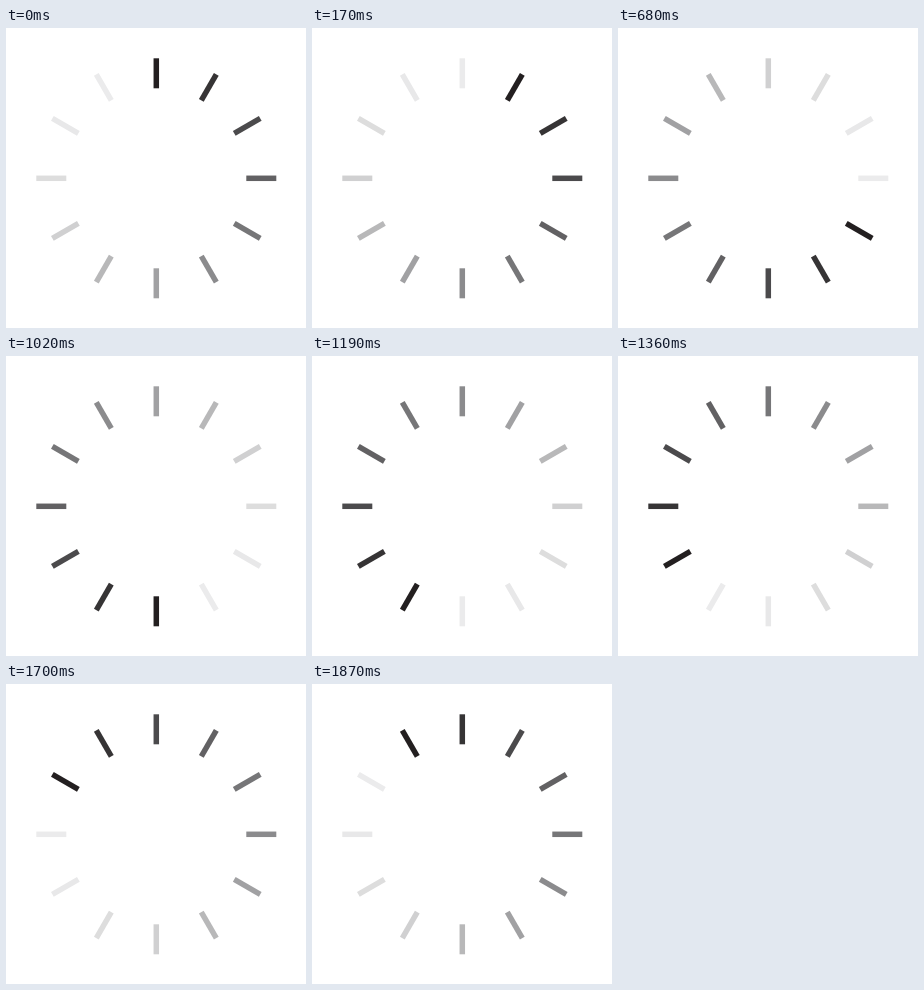
Write an HTML page with a canvas that moves like this. It is 300 px wide and 300 px high and loops after 2.04 s.

```html
<!DOCTYPE html>
<html lang="en">
<head>
<meta charset="utf-8">
<title>Spinner</title>
<style>
  html, body { margin: 0; width: 100%; height: 100%; overflow: hidden; background: #fff; }
  canvas { display: block; width: 300px; height: 300px; }
</style>
</head>
<body>
<canvas id="stage" width="300" height="300"></canvas>
<script>
const ctx = document.getElementById('stage').getContext('2d');
const BARS = 12;
const STEP = 170;
const CENTER = 150.3;
const INNER = 90;
const LENGTH = 30;
const WIDTH = 5.5;

// Shades from the leading bar clockwise to the faintest one.
const SHADES = [
  '#231f20', '#363435', '#4b4a4c', '#626163', '#767678', '#8b8b8d',
  '#a1a1a3', '#b8b8b9', '#d0d0d1', '#dddddd', '#e8e8e9', '#ebebec'
];

function draw(step) {
  ctx.fillStyle = '#fff';
  ctx.fillRect(0, 0, 300, 300);
  for (let i = 0; i < BARS; i++) {
    ctx.save();
    ctx.translate(CENTER, CENTER);
    ctx.rotate(i * 2 * Math.PI / BARS);
    ctx.fillStyle = SHADES[(i - step + BARS) % BARS];
    ctx.fillRect(-WIDTH / 2, -INNER - LENGTH, WIDTH, LENGTH);
    ctx.restore();
  }
}

const start = performance.now();

function tick() {
  const time = Math.max(0, performance.now() - start);
  draw(Math.floor(time / STEP) % BARS);
  requestAnimationFrame(tick);
}

tick();
</script>
</body>
</html>
```
